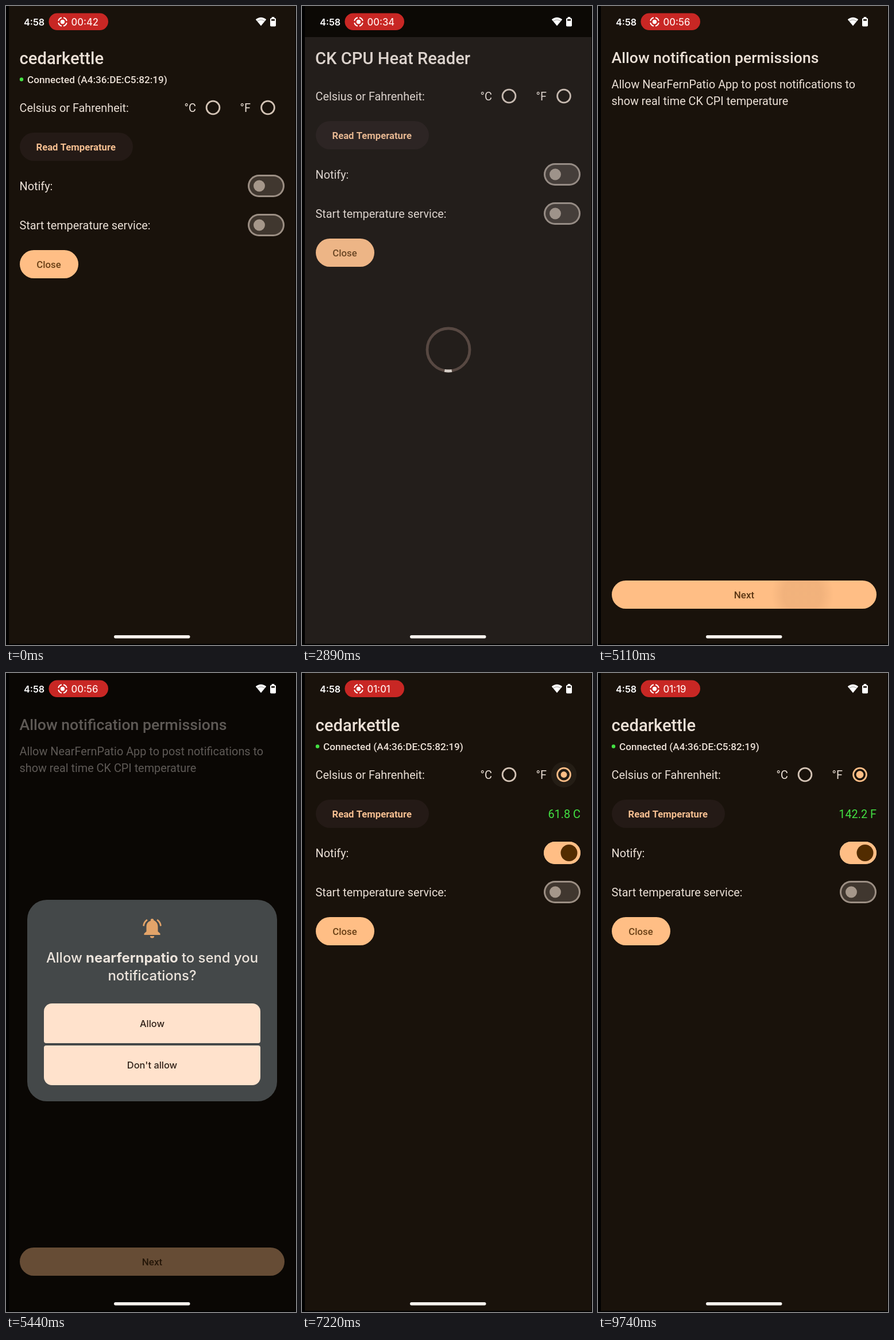
An HTML page with a canvas that plays this animation: 505 by 1110 pixels, repeating every 9.93 s.

```html
<!DOCTYPE html>
<html lang="en">
<head>
<meta charset="utf-8">
<title>Thermometer app</title>
<style>
html, body { margin: 0; width: 100%; height: 100%; overflow: hidden; background: #000; }
canvas { display: block; width: 505px; height: 1110px; }
</style>
</head>
<body>
<canvas id="stage" width="505" height="1110"></canvas>
<script>
const ctx = document.getElementById('stage').getContext('2d');
const LOOP = 9930, TAU = Math.PI * 2;
const BG = '#19120b', INK = '#ebe0d6', PEACH = '#ffbe85', GREEN = '#43e243', TAN = '#d3c3b5';
const ROBOTO = 'Roboto, sans-serif', INTER = 'Inter, sans-serif';
const BODY = 19.85;

// Moments of each action, in ms
const AT = {
  pickF: 500, readF: 1000, gotF: 1320, pickC: 1870, readC: 2200, gotC: 2430,
  loader: 2560, connected: 3870, askPage: 4440, next: 5030, dialog: 5230,
  allow: 6050, back: 6300, notify: 6600, pickF2: 7150, live: 7700, warmer: 8110, cooler: 9320
};
// Recording clock: [start ms, seconds shown at start]
const CLOCK = [[0, 42], [AT.loader, 34], [AT.connected, 53], [8110, 75]];
const TICK = 400;

const clamp = v => Math.max(0, Math.min(1, v));
const ramp = (t, from, len) => clamp((t - from) / len);
const ease = v => 1 - (1 - v) ** 2;

function text(str, x, y, size, color = INK, weight = 400, align = 'left', family = ROBOTO) {
  ctx.font = `${weight} ${size}px ${family}`;
  ctx.textAlign = align;
  ctx.fillStyle = color;
  ctx.fillText(str, x, y);
}

function box(x, y, w, h, r, color) {
  ctx.beginPath();
  ctx.roundRect(x, y, w, h, r);
  ctx.fillStyle = color;
  ctx.fill();
}

function dot(x, y, r, color) {
  ctx.beginPath();
  ctx.arc(x, y, r, 0, TAU);
  ctx.fillStyle = color;
  ctx.fill();
}

function ring(x, y, r, width, color, from = 0, to = TAU) {
  ctx.beginPath();
  ctx.arc(x, y, r, from, to);
  ctx.lineWidth = width;
  ctx.strokeStyle = color;
  ctx.stroke();
}

// Ripple strength: rises quickly, holds, fades
const pulse = (t, at) => t < at ? 0 : ramp(t, at, 110) * (1 - ramp(t, at + 250, 150));

function ripple(x, y, w, h, r, cx, cy, size, t, at, rgb) {
  const a = pulse(t, at);
  if (!a) return;
  ctx.save();
  ctx.beginPath();
  ctx.roundRect(x, y, w, h, r);
  ctx.clip();
  const rad = size * (0.5 + 1.2 * ramp(t, at, 220));
  const g = ctx.createRadialGradient(cx, cy, rad * 0.6, cx, cy, rad);
  g.addColorStop(0, `rgba(${rgb},${0.14 * a})`);
  g.addColorStop(1, `rgba(${rgb},0)`);
  ctx.fillStyle = g;
  ctx.fillRect(x, y, w, h);
  ctx.restore();
}

function radio(x, y, t, pickedAt, on) {
  const a = pulse(t, pickedAt);
  if (a) dot(x, y, 18 + 6.5 * ramp(t, pickedAt, 110), `rgba(235,224,214,${0.12 * a * a})`);
  const grow = on ? ease(ramp(t, pickedAt, 120)) : 0;
  ring(x, y, 11.4, 2.8, on ? '#fbbd87' : TAN);
  if (grow) dot(x, y, 6.5 * grow, PEACH);
}

function toggle(y, k) {
  box(421, y - 19.5, 64, 39, 19.5, '#9c8f84');
  box(424, y - 16.5, 58, 33, 16.5, '#40372f');
  if (k > 0) {
    ctx.globalAlpha = k;
    box(421, y - 19.5, 64, 39, 19.5, PEACH);
    ctx.globalAlpha = 1;
  }
  dot(441 + 24 * k, y, 10 + 4.5 * k, k > 0.5 ? '#522c00' : '#a5978a');
}

function controls(t, dy, s) {
  ctx.save();
  ctx.translate(0, dy);
  text('Celsius or Fahrenheit:', 23.5, 183.5, BODY);
  text('°C', 310.5, 183.5, BODY);
  text('°F', 407.5, 183.5, BODY);
  radio(360.5, 176.5, t, s.cAt, s.unit === 'C');
  radio(456, 176.5, t, s.fAt, s.unit === 'F');
  box(24, 220, 197, 49, 24.5, '#241a16');
  ripple(24, 220, 197, 49, 24.5, 130, 245, 70, t, s.readAt, '255,190,133');
  text('Read Temperature', 52.5, 250.5, 16.7, '#f6bf91', 600);
  if (s.value) text(s.value, 485, 251.5, BODY, s.notify ? GREEN : INK, 400, 'right');
  text('Notify:', 23.5, 319.5, BODY);
  toggle(312.5, s.notify);
  text('Start temperature service:', 23.5, 387.5, BODY);
  toggle(380.5, 0);
  box(24, 424, 102, 49, 24.5, PEACH);
  text('Close', 74.5, 454.5, 16.8, '#6a4016', 500, 'center');
  ctx.restore();
}

function mainState(t) {
  const s = { unit: '', value: '', notify: 0, cAt: LOOP, fAt: LOOP, readAt: LOOP };
  if (t >= AT.pickF) { s.unit = 'F'; s.fAt = AT.pickF; }
  if (t >= AT.readF) s.readAt = AT.readF;
  if (t >= AT.gotF) s.value = '143.2 F';
  if (t >= AT.pickC) { s.unit = 'C'; s.cAt = AT.pickC; }
  if (t >= AT.readC) s.readAt = AT.readC;
  if (t >= AT.gotC) s.value = '61.8 C';
  if (t >= AT.notify) s.notify = ease(ramp(t, AT.notify, 150));
  if (t >= AT.pickF2) { s.unit = 'F'; s.fAt = AT.pickF2; }
  if (t >= AT.live) s.value = '142.2 F';
  if (t >= AT.warmer) s.value = '143.2 F';
  if (t >= AT.cooler) s.value = '142.2 F';
  return s;
}

function mainScreen(t) {
  text('cedarkettle', 23.5, 101, 29.2, INK, 500);
  dot(27, 127.5, 3.2, GREEN);
  text('Connected (A4:36:DE:C5:82:19)', 37, 133.5, 17.2, INK, 500);
  controls(t, 0, mainState(t));
}

function loaderScreen(t) {
  text('CK CPU Heat Reader', 23, 101, 29.2, INK, 500);
  controls(0, -20, mainState(0));
  ctx.fillStyle = 'rgba(110,118,140,.12)';
  ctx.fillRect(5, 54, 499, 1054);
  ctx.fillStyle = 'rgba(0,0,0,.5)';
  ctx.fillRect(5, 0, 499, 54);
  const p = (t - 2890) / 533;
  const mid = Math.PI / 2 + p * TAU;
  const half = 0.17 + 0.9 * Math.sin(p * Math.PI) ** 2;
  ring(255, 597, 37, 4.8, '#574842');
  ring(255, 597, 37, 4.8, '#d8d0c9', mid - half, mid + half);
}

function bell(x, y) {
  ctx.save();
  ctx.translate(x, y);
  const c = '#e3a469';
  ctx.fillStyle = c;
  ctx.beginPath();
  ctx.moveTo(-14, 12);
  ctx.lineTo(-14, 9.5);
  ctx.lineTo(-10, 6);
  ctx.lineTo(-10, -2);
  ctx.bezierCurveTo(-10, -8, -7, -11.5, -2.5, -12.5);
  ctx.arc(0, -13.5, 2.7, Math.PI, 0);
  ctx.bezierCurveTo(7, -11.5, 10, -8, 10, -2);
  ctx.lineTo(10, 6);
  ctx.lineTo(14, 9.5);
  ctx.lineTo(14, 12);
  ctx.fill();
  ctx.beginPath();
  ctx.arc(0, 14, 3.6, 0, Math.PI);
  ctx.fill();
  ring(0, -2, 15, 2.8, c, -0.96, -0.1);
  ring(0, -2, 15, 2.8, c, Math.PI + 0.1, Math.PI + 0.96);
  ctx.restore();
}

function dialog(t, k) {
  ctx.fillStyle = `rgba(0,0,0,${0.6 * k})`;
  ctx.fillRect(5, 0, 500, 1110);
  ctx.save();
  ctx.globalAlpha = k;
  const zoom = 0.92 + 0.08 * k;
  ctx.translate(254.5, 569);
  ctx.scale(zoom, zoom);
  ctx.translate(-254.5, -569);
  box(37, 394, 435, 350, 34, '#444849');
  bell(254.5, 443);

  const parts = [['Allow ', 500], ['nearfernpatio', 700], [' to send you', 500]];
  const size = 23.9;
  const widths = parts.map(([str, weight]) => {
    ctx.font = `${weight} ${size}px ${INTER}`;
    return ctx.measureText(str).width;
  });
  let x = 254.5 - widths.reduce((a, b) => a + b) / 2;
  parts.forEach(([str, weight], i) => {
    text(str, x, 503, size, '#ece4dc', weight, 'left', INTER);
    x += widths[i];
  });
  text('notifications?', 254.5, 533.5, size, '#ece4dc', 500, 'center', INTER);

  box(66, 574, 377, 69, [14, 14, 4, 4], '#ffe2cc');
  ripple(66, 574, 377, 69, [14, 14, 4, 4], 300, 608, 120, t, AT.allow, '60,35,15');
  box(66, 647, 377, 69, [4, 4, 14, 14], '#ffe2cc');
  text('Allow', 254.5, 614.5, 16.4, '#2f2118', 500, 'center', INTER);
  text("Don't allow", 254.5, 687, 16.4, '#2f2118', 500, 'center', INTER);
  ctx.restore();
}

function askScreen(t) {
  text('Allow notification permissions', 23.5, 99, 26.6, INK, 500);
  text('Allow NearFernPatio App to post notifications to', 23.5, 143, BODY);
  text('show real time CK CPI temperature', 23.5, 172, BODY);
  box(24, 998, 461, 49, 24.5, PEACH);
  ripple(24, 998, 461, 49, 24.5, 356, 1022, 58, t, AT.next, '125,75,45');
  text('Next', 254.5, 1028.5, 17, '#5b3714', 500, 'center');
  const k = ease(ramp(t, AT.dialog, 180)) * (1 - ramp(t, AT.back - 120, 120));
  if (k) dialog(t, k);
}

function statusBar(t) {
  text('4:58', 31, 33.5, 16.2, '#fff', 600, 'left', INTER);
  box(74.5, 12.5, 103.5, 29.5, 14.75, '#c82724');
  dot(98.5, 27.5, 3.7, '#fff');
  for (let i = 0; i < 4; i++) {
    const a = i * TAU / 4 + Math.PI / 4;
    ring(98.5, 27.5, 7.4, 2, '#fff', a - 0.58, a + 0.58);
  }
  const [start, base] = CLOCK.filter(c => t >= c[0]).pop();
  const sec = base + Math.floor((t - start) / TICK);
  const two = n => String(n).padStart(2, '0');
  text(`${two(Math.floor(sec / 60))}:${two(sec % 60)}`, 113.5, 33.5, 16.6, '#ffece9', 500, 'left', INTER);

  ctx.fillStyle = '#fff';
  ctx.beginPath();
  ctx.moveTo(444, 34.5);
  ctx.lineTo(434.8, 23.5);
  ctx.quadraticCurveTo(444, 16, 453.2, 23.5);
  ctx.fill();
  ring(444, 34, 10, 0.8, 'rgba(25,18,11,.55)', Math.PI * 1.28, Math.PI * 1.72);
  box(460, 21, 10, 14.5, 1.8, '#fff');
  box(462.7, 19, 4.6, 3, 0.5, '#fff');
  box(462, 23, 6, 2.6, 0, BG);
}

function draw(t) {
  ctx.fillStyle = '#000';
  ctx.fillRect(0, 0, 505, 1110);
  ctx.fillStyle = BG;
  ctx.fillRect(5, 0, 499, 1108);
  if (t >= AT.loader && t < AT.connected) loaderScreen(t);
  else if (t >= AT.askPage && t < AT.back) askScreen(t);
  else mainScreen(t);
  statusBar(t);
  box(188, 1093, 132.5, 5.5, 2.75, '#f6f2ee');
}

function frame(now) {
  draw(now % LOOP);
  requestAnimationFrame(frame);
}
draw(0);
requestAnimationFrame(frame);
</script>
</body>
</html>
```
